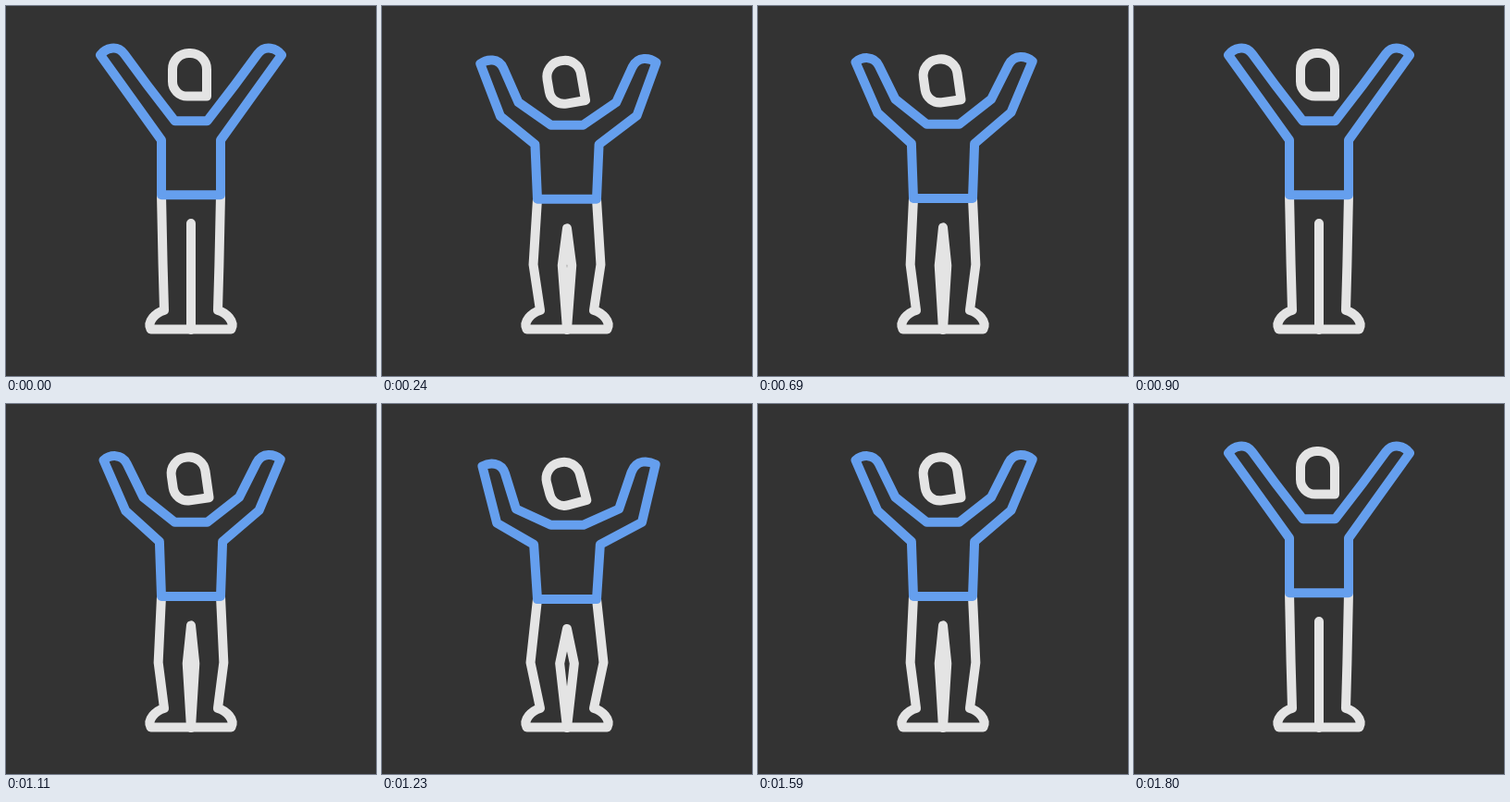
An HTML page with a canvas for the animation above (1.83 s loop, 400 px wide and 400 px high).

```html
<!DOCTYPE html>
<html lang="en">
<head>
<meta charset="utf-8">
<title>Stretching figure</title>
<style>
  html, body { margin: 0; width: 100%; height: 100%; overflow: hidden; background: #333; }
  canvas { display: block; width: 400px; height: 400px; }
</style>
</head>
<body>
<canvas id="stage" width="400" height="400"></canvas>
<script>
const ctx = document.getElementById('stage').getContext('2d');
const LOOP = 1830, STEP = 30, CYCLE = 900;
const BLUE = '#659fee', LIGHT = '#e4e4e4';

// Each point is [x, y] standing, then [x, y] crouched.
const LEFT_ARM = {
  hip: [168, 204.3, 168, 212.3],
  armpit: [168, 145, 163.3, 153.4],
  elbow: [135.4, 99.5, 121.8, 135],
  tip: [102, 53, 109.8, 70.3],
  bend1: [107.5, 45.5, 118, 66.5],
  bend2: [120, 41.5, 131, 67],
  palm: [128, 52, 134, 80],
  inner: [152.6, 85.4, 143.3, 119.5],
  neck: [182.5, 124.3, 182.5, 132.2]
};

const mirror = ([x0, y0, x1, y1]) => [400 - x0, y0, 400 - x1, y1];
const RIGHT_ARM = {};
for (const k in LEFT_ARM) RIGHT_ARM[k] = mirror(LEFT_ARM[k]);

// The right arm opens a little wider than the left.
const WIDER = {
  elbow: [284.5, 134], tip: [295.2, 68], bend1: [287, 64.5],
  bend2: [274, 63.5], palm: [269.3, 78], inner: [258, 119.5]
};
for (const k in WIDER) RIGHT_ARM[k].splice(2, 2, ...WIDER[k]);

const HIP = LEFT_ARM.hip;
const KNEE = [169.6, 279.5, 158.6, 279.5];
const CROTCH = [200, 235, 200, 244.7];
const INNER_KNEE = [200, 280.5, 190.5, 280.5];

const mix = (a, b, p) => a + (b - a) * p;
const at = (q, p) => [mix(q[0], q[2], p), mix(q[1], q[3], p)];

function poly(points, p, close) {
  ctx.beginPath();
  points.forEach(q => ctx.lineTo(...at(q, p)));
  if (close) ctx.closePath();
  ctx.stroke();
}

function leg(side, p) {
  ctx.save();
  if (side > 0) {
    ctx.translate(400, 0);
    ctx.scale(-1, 1);
  }
  ctx.beginPath();
  ctx.moveTo(...at(HIP, p));
  ctx.lineTo(...at(KNEE, p));
  ctx.lineTo(171, 329);
  ctx.bezierCurveTo(162, 331.5, 152, 341, 156.5, 349.5);
  ctx.lineTo(200, 349.5);
  ctx.stroke();
  ctx.restore();
}

function shirt(p) {
  const l = k => at(LEFT_ARM[k], p), r = k => at(RIGHT_ARM[k], p);
  ctx.beginPath();
  for (const k of ['hip', 'armpit', 'elbow', 'tip']) ctx.lineTo(...l(k));
  ctx.bezierCurveTo(...l('bend1'), ...l('bend2'), ...l('palm'));
  for (const k of ['inner', 'neck']) ctx.lineTo(...l(k));
  for (const k of ['neck', 'inner', 'palm']) ctx.lineTo(...r(k));
  ctx.bezierCurveTo(...r('bend2'), ...r('bend1'), ...r('tip'));
  for (const k of ['elbow', 'armpit', 'hip']) ctx.lineTo(...r(k));
  ctx.closePath();
  ctx.stroke();
}

function head(p) {
  const w = 18.5, h = 23.3;
  ctx.save();
  ctx.translate(mix(198.5, 197.3, p), mix(74.3, 88.7, p));
  ctx.rotate(-18 * Math.PI / 180 * p);
  ctx.beginPath();
  ctx.roundRect(-w, -h, 2 * w, 2 * h, [17.5, 17.5, 0, 16]);
  ctx.stroke();
  ctx.restore();
}

function draw(t) {
  const u = 1 - Math.abs(1 - (t % CYCLE) / (CYCLE / 2));
  const p = u * u * (3 - 2 * u);
  ctx.fillStyle = '#333';
  ctx.fillRect(0, 0, 400, 400);
  ctx.lineWidth = 10;
  ctx.lineCap = ctx.lineJoin = 'round';
  ctx.strokeStyle = LIGHT;
  leg(-1, p);
  leg(1, p);
  poly([CROTCH, INNER_KNEE, [200, 350, 200, 350], mirror(INNER_KNEE)], p, true);
  head(p);
  ctx.strokeStyle = BLUE;
  shirt(p);
}

const start = performance.now();
function tick() {
  const t = (performance.now() - start) % LOOP;
  draw(Math.floor(t / STEP) * STEP);
  requestAnimationFrame(tick);
}
tick();
</script>
</body>
</html>
```
